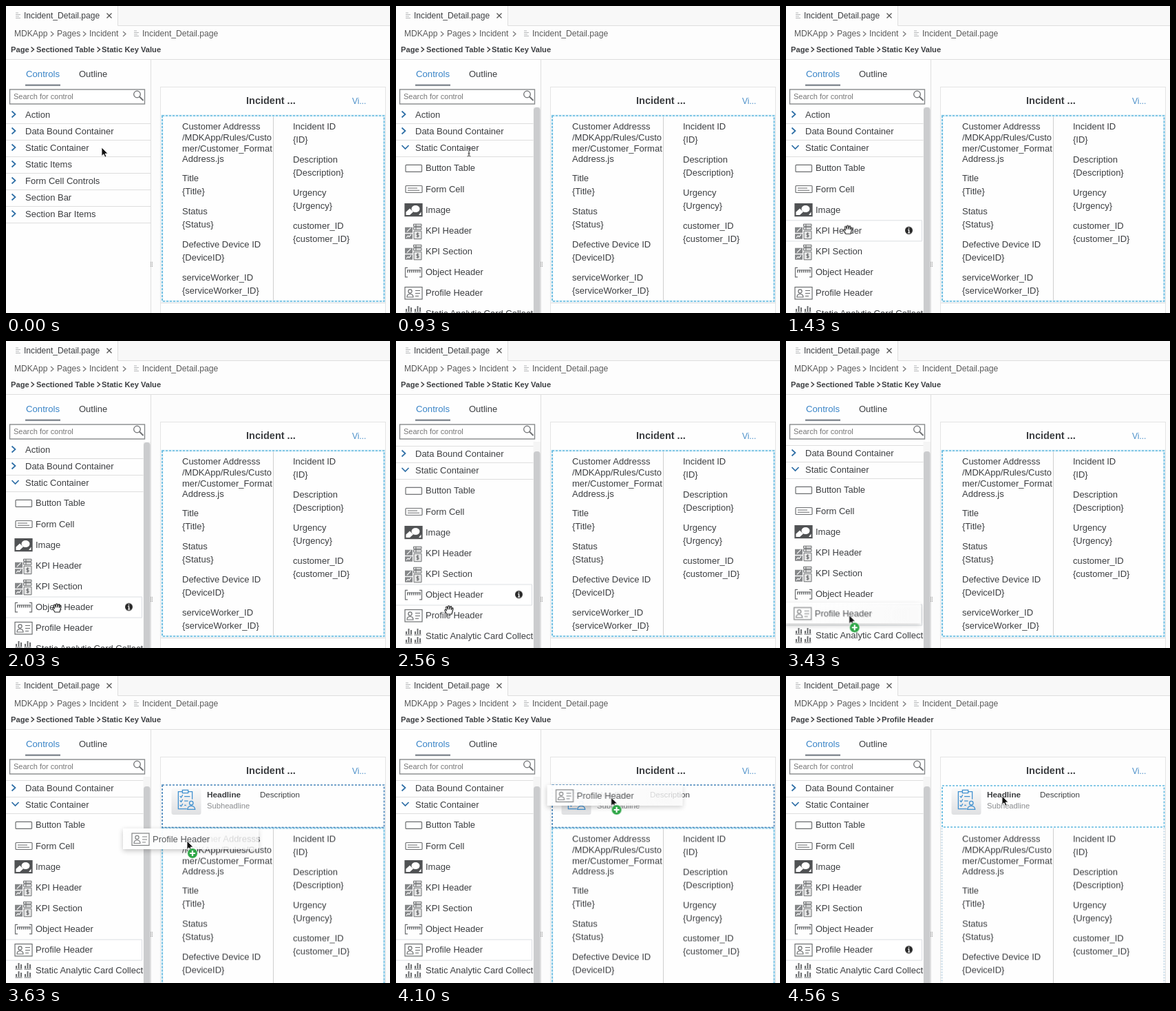
Recreate the animation shown at these times as an HTML page. Size 558 by 445 pixels, loop 5.03 s.

```html
<!DOCTYPE html>
<html lang="en">
<head>
<meta charset="utf-8">
<title>Page editor: drag a control</title>
<style>
html, body { margin: 0; width: 100%; height: 100%; overflow: hidden; background: #fff; }
svg { display: block; width: 558px; height: 445px; }
text { font: 13px "Liberation Sans", Arial, sans-serif; fill: #3c3e41; white-space: pre; }
.tab { font-size: 12.1px; }
.crumb { font-size: 12.1px; fill: #5a5a5a; }
.path { font-size: 11.15px; font-weight: bold; }
.line { stroke: #dedede; fill: none; }
.chev { stroke: #2d6ea6; stroke-width: 1.7; fill: none; }
.sep { stroke: #777; stroke-width: 1.2; fill: none; }
.icon { stroke: #6c6e70; stroke-width: 1.2; fill: none; }
.dash { stroke: #62b9e0; stroke-width: 1.7; stroke-dasharray: 3 2; fill: none; }

/* one shared 5030 ms clock */
.anim { animation: 5030ms linear infinite; }
.step { animation-timing-function: step-end; }

#cursor { animation-name: move; }
@keyframes move {
  0%, .6% { transform: translate(139px, 205px); }
  3.3% { transform: translate(130px, 207px); }
  8.55%, 18.49% { transform: translate(106px, 211.5px); }
  28.4% { transform: translate(90px, 318px); }
  36% { transform: translate(76px, 372px); }
  38.4%, 46.32% { transform: translate(74px, 381px); }
  50.9%, 56.86% { transform: translate(77px, 384px); }
  60.83% { transform: translate(91px, 396px); }
  68.19% { transform: translate(91px, 398px); }
  70% { transform: translate(150px, 340px); }
  72.17%, 72.8% { transform: translate(263px, 239px); }
  77.53% { transform: translate(300px, 192px); }
  82%, 100% { transform: translate(314px, 174px); }
}
#scroll { animation-name: scroll; }
@keyframes scroll {
  0%, 46.32% { transform: none; }
  50.5% { transform: translateY(-18px); }
  55.67%, 100% { transform: translateY(-19px); }
}
#thumb { animation-name: thumb; }
@keyframes thumb {
  0%, 46.32% { transform: none; }
  50.5%, 100% { transform: translateY(13px); }
}
#hover { animation-name: hover; }
@keyframes hover {
  0% { opacity: 0; transform: none; }
  19.3% { opacity: 1; transform: none; }
  22.1% { opacity: 1; transform: translateY(30.1px); }
  25% { opacity: 1; transform: translateY(60.2px); }
  27.8% { opacity: 1; transform: translateY(90.3px); }
  31.6% { opacity: 1; transform: translateY(120.4px); }
  35.9% { opacity: 1; transform: translateY(150.5px); }
  57.5%, 100% { opacity: 1; transform: translateY(180.6px); }
}
#table { animation-name: push; }
@keyframes push { 0% { transform: none; } 71%, 100% { transform: translateY(61.5px); } }

#closed { animation-name: closed; }
@keyframes closed { 0% { opacity: 1; } 11.13%, 100% { opacity: 0; } }
.open { animation-name: open; }
@keyframes open { 0% { opacity: 0; } 11.13%, 100% { opacity: 1; } }
#header { animation-name: header; }
@keyframes header { 0% { opacity: 0; } 71%, 100% { opacity: 1; } }
.before { animation-name: before; }
@keyframes before { 0% { opacity: 1; } 90.66%, 100% { opacity: 0; } }
.after { animation-name: after; }
@keyframes after { 0% { opacity: 0; } 90.66%, 100% { opacity: 1; } }
#info { animation-name: info; }
@keyframes info { 0% { opacity: 1; } 68.19% { opacity: 0; } 82%, 100% { opacity: 1; } }
.drag { animation-name: drag; }
@keyframes drag { 0% { opacity: 0; } 68.19% { opacity: 1; } 82%, 100% { opacity: 0; } }
#arrow { animation-name: arrow; }
@keyframes arrow { 0% { opacity: 1; } 5% { opacity: 0; } 68.19%, 100% { opacity: 1; } }
#beam { animation-name: beam; }
@keyframes beam { 0% { opacity: 0; } 5% { opacity: 1; } 19.3%, 100% { opacity: 0; } }
#grab { animation-name: grab; }
@keyframes grab { 0% { opacity: 0; } 19.3% { opacity: 1; } 57.5%, 100% { opacity: 0; } }
#point { animation-name: point; }
@keyframes point { 0% { opacity: 0; } 57.5% { opacity: 1; } 68.19%, 100% { opacity: 0; } }
</style>
</head>
<body>
<svg viewBox="0 0 558 445">
  <defs>
    <clipPath id="listClip"><path d="M0 146H210V445H0Z"/></clipPath>
    <linearGradient id="tile" x2="0" y2="1">
      <stop stop-color="#fafafa"/><stop offset="1" stop-color="#dfe0e2"/>
    </linearGradient>
    <linearGradient id="fade">
      <stop stop-color="#fff" stop-opacity=".96"/><stop offset=".5" stop-color="#fff" stop-opacity=".9"/>
      <stop offset="1" stop-color="#fff" stop-opacity=".7"/>
    </linearGradient>
    <filter id="soft" x="-10%" y="-40%" width="120%" height="200%">
      <feDropShadow dx="0" dy="2.5" stdDeviation="3.5" flood-color="#000" flood-opacity=".24"/>
    </filter>
    <g id="file" stroke="#b5b7b9"><path d="M0-4H4M0-1.5H7M0 1H5M0 3.5H7"/></g>
  </defs>

  <rect width="558" height="445" fill="#fdfdfd"/>

  <!-- file tab and breadcrumbs -->
  <path d="M162.5 0H558V28.5H162.5Z" fill="#f8f8f8"/>
  <path class="line" d="M162.5 0V28.5H558"/>
  <use href="#file" x="14" y="14"/>
  <text class="tab" x="26" y="18.2">Incident_Detail.page</text>
  <path d="M146.5 10.5L153.5 17.5M153.5 10.5L146.5 17.5" stroke="#555" stroke-width="1.3"/>
  <text class="crumb" x="12" y="44">MDKApp</text>
  <text class="crumb" x="74" y="44">Pages</text>
  <text class="crumb" x="121" y="44">Incident</text>
  <text class="crumb" x="198" y="44">Incident_Detail.page</text>
  <path class="sep" d="M65 37L69 40.5L65 44M112 37L116 40.5L112 44M170 37L174 40.5L170 44"/>
  <use href="#file" x="186" y="40"/>
  <text class="path" x="7" y="67">Page</text>
  <text class="path" x="44" y="67">Sectioned Table</text>
  <path class="sep" d="M36.500 59.500L40.500 63L36.500 66.500M132.500 59.500L136.500 63L132.500 66.500" style="stroke:#444;stroke-width:1.5"/>
  <text class="path anim step before" x="139" y="67">Static Key Value</text>
  <text class="path anim step after" x="139" y="67">Profile Header</text>
  <path class="line" d="M0 77.500H558"/>

  <!-- design canvas -->
  <rect x="211" y="78" width="347" height="367" fill="#fcfcfc"/>
  <rect x="224.5" y="117.5" width="327" height="340" fill="#fefefe" stroke="#e4e4e4"/>
  <text x="349" y="142" style="font-size:14.5px;font-weight:bold">Incident ...</text>
  <text x="503" y="142" style="font-size:12px;fill:#4a8fc9">Vi...</text>

  <g id="table" class="anim step">
    <path class="anim step after" d="M226.5 159V445M549.5 159V445" stroke="#d3e2ec" stroke-width="3" stroke-dasharray="2 2"/>
    <path class="line" d="M388.5 159V428" style="stroke:#cfcfcf"/>
    <path class="line" d="M225 430.5H551"/>
    <g class="anim step before">
      <rect x="227" y="159" width="322.5" height="269" fill="none" stroke="#e3f2f9" stroke-width="3"/>
      <rect class="dash" x="227" y="159" width="322.5" height="269"/>
    </g>
    <g id="fields"></g>
  </g>

  <g id="header" class="anim step">
    <rect x="225" y="157" width="326" height="62" fill="#fefefe"/>
    <rect x="240.5" y="162.5" width="43" height="38.5" rx="3" fill="url(#tile)"/>
    <g fill="none" stroke="#4191d0" stroke-width="1.4" transform="translate(249 164) scale(.92) translate(-249 -164)">
      <path d="M264 195H250.5V168H272.5V180"/>
      <path d="M257 170V165.5H266V170Z" fill="#f4f7f9"/>
      <path d="M253 175L255 177L257.5 173M253 182L255 184L257.5 180M253 189L255 191L257.5 187M260 175.5H269M260 182.5H266M260 189.5H263"/>
      <circle cx="271" cy="186" r="3"/>
      <path d="M265 196Q265.5 190.5 271 190.5T277 196Z"/>
    </g>
    <text x="292" y="175.6" style="font-size:11.8px;font-weight:bold">Headline</text>
    <text x="292" y="192" style="font-size:11.2px;fill:#8a8c8f">Subheadline</text>
    <text x="369" y="175.6" style="font-size:11.6px">Description</text>
    <rect class="dash anim step before" x="227" y="158" width="322.5" height="61.5" style="stroke:#4a86ba"/>
    <rect class="dash anim step after" x="227" y="159" width="322.5" height="60"/>
  </g>

  <!-- sidebar -->
  <rect y="78" width="210" height="367" fill="#fefefe"/>
  <path class="line" d="M210.5 78V445"/>
  <path d="M210.5 371V379M212.5 371V379" stroke="#888" stroke-dasharray="1 1"/>
  <text x="29" y="102.5" style="fill:#3984c7;font-size:13.2px">Controls</text>
  <text x="106" y="102.5">Outline</text>
  <path d="M28 114.7H79" stroke="#878e95" stroke-width="2.6"/>
  <rect x="5.5" y="121" width="196" height="21" fill="#fff" stroke="#888a8c" stroke-width="1.4"/>
  <text x="11" y="135.4" style="font-size:11px;fill:#777">Search for control</text>
  <circle cx="190.5" cy="128" r="4.8" fill="none" stroke="#707274" stroke-width="1.3"/>
  <path d="M194 131.5L199.5 137" stroke="#707274" stroke-width="2"/>

  <g clip-path="url(#listClip)">
    <g id="scroll" class="anim">
      <g id="fixed"></g>
      <g id="closed" class="anim step"></g>
      <g class="anim step open">
        <g id="hover" class="anim step">
          <path d="M-1 220.5H197.5V250.5H-1Z" fill="#fff" stroke="#dcdfe3"/>
          <g id="info" class="anim step">
            <circle cx="178.5" cy="235" r="5.5" fill="#2a2a2a"/>
            <path d="M178.5 231.3V232.8M177 234.3H178.7V238M177 238.3H180.3" stroke="#fff" stroke-width="1.3" fill="none"/>
          </g>
        </g>
        <g id="items"></g>
      </g>
    </g>
    <g class="anim step open">
      <rect x="199.5" y="146" width="10.5" height="299" fill="#f5f5f5"/>
      <rect id="thumb" class="anim" x="200" y="147" width="9.5" height="320" rx="4" fill="#cbccce"/>
    </g>
  </g>

  <!-- pointer with its dragged row -->
  <g id="cursor" class="anim">
    <g class="anim step drag">
      <rect x="-93" y="-18" width="197" height="30" fill="url(#fade)" filter="url(#soft)"/>
      <g id="ghost" transform="translate(-93 -2.5)" opacity=".85"></g>
    </g>
    <g id="arrow" class="anim step">
      <path d="M0 0V12.5L2.9 9.8L4.9 14.2L7 13.2L5 9H9Z" fill="#111" stroke="#fff" stroke-width=".8"/>
    </g>
    <g class="anim step drag">
      <circle cx="8" cy="18" r="7.3" fill="#2ea647" stroke="#e9f5eb" stroke-width=".8"/>
      <path d="M8 14V22M4 18H12" stroke="#fff" stroke-width="2.2"/>
    </g>
    <path id="beam" class="anim step" d="M-2.500-6Q0-6 0-4.500Q0-6 2.500-6M0-4.500V4.500M-2.500 6Q0 6 0 4.500Q0 6 2.500 6M-1.500 2H1.500" fill="none" stroke="#333"/>
    <g fill="#fff" stroke="#222" stroke-width="1.1" stroke-linejoin="round">
      <path id="grab" class="anim step" d="M-3 12L-6 7Q-6.500 5 -4.500 5.500L-3.500 7L-4.500 2Q-3.500 0 -2.500 2L-1.500 5L-1.500 .5Q-.3-1 .7 .5L1 5L2 1Q3.300 0 3.800 1.500L3.500 5.500L4.800 3Q6.300 2.500 6 4.500L4.500 10L4 12Z"/>
      <path id="point" class="anim step" d="M-2 13L-5.500 8Q-6 6 -4 6.500L-2.500 8V1Q-1.500-1 -.5 1V5Q1 4 2 5.500Q3.500 4.800 4.200 6.300Q6 6 6 8L5 11L4.500 13Z"/>
    </g>
  </g>
</svg>
<script>
const fill = (id, html) => document.getElementById(id).innerHTML = html;
const label = (x, y, text) => `<text x="${x}" y="${y}">${text}</text>`;

// key/value fields: each column is a list of [centre y, text]
const column = (x, lines) => lines.map(([y, text]) => label(x, y + 3.8, text)).join('');
const pairs = (top, names) => names.flatMap(([name, value], i) =>
  [[top + i * 48, name], [top + 19 + i * 48, `{${value || name}}`]]);

fill('fields',
  column(256, [
    [175, 'Customer Addresss'], [191, '/MDKApp/Rules/Custo'],
    [207, 'mer/Customer_Format'], [222, 'Address.js'],
    ...pairs(250, [['Title'], ['Status'], ['Defective Device ID', 'DeviceID'], ['serviceWorker_ID']])
  ]) +
  column(417, pairs(175, [['Incident ID', 'ID'], ['Description'], ['Urgency'], ['customer_ID']])));

// collapsible groups
const groups = ['Action', 'Data Bound Container', 'Static Container', 'Static Items',
  'Form Cell Controls', 'Section Bar', 'Section Bar Items'];
const right = y => `<path class="chev" d="M8.5 ${y - 5.5}L13.5 ${y - 1}L8.5 ${y + 3.5}"/>`;
const down = y => `<path class="chev" d="M8.5 ${y - 4}L13.5 ${y + 1}L18.5 ${y - 4}"/>`;
const group = (name, i) => {
  const y = 158 + i * 24;
  return label(28, y + 4, name) + `<path class="line" d="M0 ${y + 12.5}H210"/>`;
};
const rows = groups.map(group);
const arrows = groups.map((_, i) => right(158 + i * 24));
fill('fixed', rows.slice(0, 3).join('') + arrows[0] + arrows[1]);
fill('closed', arrows[2] + rows.slice(3).join('') + arrows.slice(3).join(''));

// control icons, centred on y = 0
const kpi = `<path d="M13-5H24V3H13ZM13 4.5H24V12H13Z" fill="#858789" stroke="none"/>
  <path d="M16 1.5L21.5-4M15 10L17.5 7.5L19 9L22 5.500" stroke="#fff"/>
  <path d="M25.5-9.500H37V-6.500H25.5ZM25.5-5H37V-1.500H25.5ZM26 .5H37V12H26Z" fill="#e8e8e8" stroke-width="1"/>
  <path d="M29-9.500V-1.500M33.500 4H30V6.300H33V8.600H29.500M31.500 2.500V10" stroke-width="1"/>`;
const bars = (x, y) => `<path d="M${x} ${y}V${y - 4}M${x + 3.5} ${y}V${y - 8}M${x + 7} ${y}V${y - 6}" stroke-width="2"/>
  <path d="M${x - 1.5} ${y + 1}H${x + 8.5}" stroke-width="1"/>`;
const items = [
  ['Button Table', '<rect x="14" y="-5" width="23.5" height="10" rx="1"/>'],
  ['Form Cell', `<rect x="14" y="-5" width="24" height="10" rx="1"/>
    <path d="M17-1.500H31M17 1.700H34" stroke-width="1.1"/>`],
  ['Image', `<rect x="13" y="-9" width="25" height="18" fill="#505254" stroke="#505254"/>
    <path d="M14.5 7.500V3L20-2L25 3L20 7.500ZM33 7.500L36.500 3V7.500Z" fill="#fff" stroke="none"/>
    <ellipse cx="28.5" cy="-1.500" rx="6" ry="5" fill="#fff" stroke="none"/>`],
  ['KPI Header', kpi],
  ['KPI Section', kpi],
  ['Object Header', `<path d="M17-6.500H13.5V7H17M34-6.500H37.5V7H34"/>
    <path d="M16-1.500H36" stroke-width="4" stroke-dasharray="1.5 1.5"/><path d="M16-3H36" stroke-width="1"/>`],
  ['Profile Header', `<rect x="13" y="-8.500" width="25" height="17.5"/>
    <circle cx="20.5" cy="-2.500" r="2.6"/><path d="M16 6Q16 1.500 20.500 1.500T25 6Z"/>
    <path d="M28-3.500H35M28 .5H35M28 4.500H33"/>`],
  ['Static Analytic Card Collection', bars(15, -3) + bars(28, -3) + bars(15, 9) + bars(28, 9)]
];
const item = ([name, icon], y) =>
  `<g transform="translate(0 ${y})"><g class="icon">${icon}</g>${label(43, 4, name)}</g>`;
fill('items', down(206) + items.map((it, i) => item(it, 235.4 + i * 30.1)).join(''));
fill('ghost', item(items[6], 0));
</script>
</body>
</html>
```
